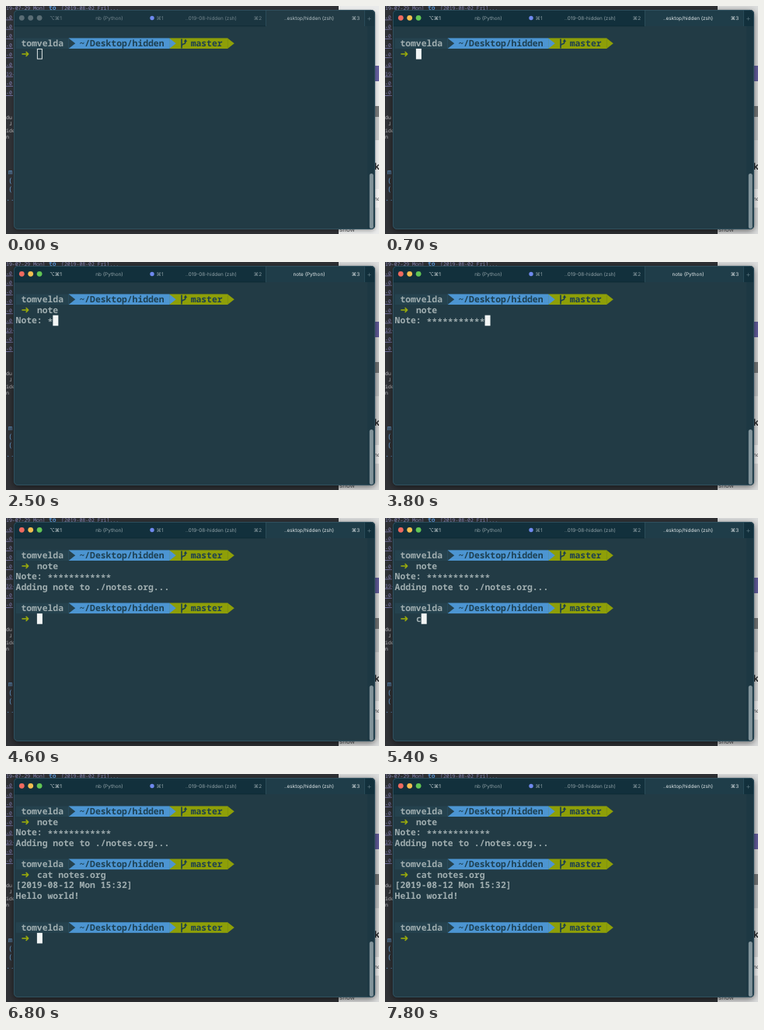
Write an HTML page with a canvas that moves like this. It is 480 px wide and 294 px high and loops after 7900 ms.

```html
<!DOCTYPE html>
<html lang="en">
<head>
<meta charset="utf-8">
<title>Terminal note</title>
<style>
html, body { margin: 0; width: 100%; height: 100%; overflow: hidden; background: #303236; }
canvas { display: block; }
</style>
</head>
<body>
<canvas id="stage" width="480" height="294"></canvas>
<script>
const ctx = document.getElementById('stage').getContext('2d');
const LOOP = 7900, LEFT = 12.6, TOP = 41.4, COL = 6.82, ROW = 13.62;
const MONO = '600 11.37px "Noto Sans Mono", "DejaVu Sans Mono", monospace';
const LABEL = '6.4px Inter, "DejaVu Sans", sans-serif';
const BG = '#223b45', BAR = '#12303c', TEXT = '#a0aeb0', INK = '#1d3f50';
const BLUE = '#4c95d2', GREEN = '#8e9f08';
const USER = 'tomvelda';

ctx.textBaseline = 'alphabetic';
ctx.textRendering = 'geometricPrecision';

const colX = col => LEFT + col * COL;
const rowY = row => TOP + row * ROW;

function rect(x, y, w, h, color) {
  ctx.fillStyle = color;
  ctx.fillRect(x, y, w, h);
}

function text(str, x, y, color, font, align = 'left') {
  ctx.font = font;
  ctx.fillStyle = color;
  ctx.textAlign = align;
  ctx.fillText(str, x, y);
}

function dot(x, y, r, color) {
  ctx.fillStyle = color;
  ctx.beginPath();
  ctx.arc(x, y, r, 0, 7);
  ctx.fill();
}

function write(str, col, row, color = TEXT) {
  text(str, colX(col), rowY(row) + 10.6, color, MONO);
}

function chevron(col, row, color) {
  const x = colX(col) - 0.2, y = rowY(row);
  ctx.fillStyle = color;
  ctx.beginPath();
  ctx.moveTo(x, y);
  ctx.lineTo(x + 8.6, y + ROW / 2);
  ctx.lineTo(x, y + ROW);
  ctx.fill();
}

function branchIcon(col, row) {
  ctx.save();
  ctx.translate(colX(col), rowY(row));
  ctx.strokeStyle = ctx.fillStyle = INK;
  ctx.lineWidth = 1.6;
  ctx.beginPath();
  ctx.moveTo(2, 1);
  ctx.lineTo(2, 13);
  ctx.moveTo(2, 10.5);
  ctx.quadraticCurveTo(2, 8.2, 4.5, 7.6);
  ctx.quadraticCurveTo(7, 7, 7, 4);
  ctx.stroke();
  ctx.beginPath();
  ctx.moveTo(4.8, 4.6);
  ctx.lineTo(7, 1);
  ctx.lineTo(9.2, 4.6);
  ctx.fill();
  ctx.restore();
}

function prompt(row, command) {
  const y = rowY(row);
  rect(LEFT, y, 10 * COL, ROW, '#25424e');
  rect(colX(10), y, 19 * COL, ROW, BLUE);
  rect(colX(29), y, 11 * COL, ROW, GREEN);
  chevron(10, row, '#25424e');
  chevron(29, row, BLUE);
  chevron(40, row, GREEN);
  write(USER, 1, row);
  write('~/Desktop/hidden', 12, row, INK);
  branchIcon(31, row);
  write('master', 33, row, INK);
  text('➜', colX(1), rowY(row + 1) + 11.2, '#9aab0c', 'bold 13px "DejaVu Sans", sans-serif');
  write(command, 4, row + 1);
}

function cursor(col, row, focused) {
  const x = colX(col), y = rowY(row);
  if (focused) return rect(x, y, 7, ROW, '#f2f5f5');
  ctx.strokeStyle = '#dfe6e6';
  ctx.lineWidth = 1;
  ctx.strokeRect(x + 0.5, y + 0.5, 6, ROW - 1);
}

function desktop(focused) {
  rect(0, 0, 480, 294, '#303236');
  rect(428, 0, 52, 294, focused ? '#dcdddd' : '#e9eaea');
  const small = '6.5px "Noto Sans Mono", monospace';
  text('19-07-29 Mon]', 0, 5, '#9291c4', small);
  text('to', 55, 5, '#5b9bdc', 'bold 8px "Noto Sans Mono", monospace');
  text('[2019-08-02 Fri]...', 71, 5, '#9291c4', small);

  for (let i = 0; i < 9; i++) {
    const y = 16.5 + i * 12.2;
    text(i === 6 ? '19-' : '-0', 0, y, '#8584bb', small);
    rect(0, y + 1, 9, 0.8, '#8584bb');
  }
  ['du', ' J', 'ide', 'n'].forEach((s, i) => text(s, 0, 146 + i * 8.3, '#b9babd', small));
  ['m', '(', '(', '..'].forEach((s, i) =>
    text(s, i < 3 ? 3 : 0, 217 + i * 11.2, '#65a0d6', '9px "Noto Sans Mono", monospace'));

  rect(473, 77, 7, 20, '#655f9f');
  rect(473, 129, 7, 14, '#77797a');
  rect(473, 143, 7, 30, '#c6c8c9');
  text('k', 474, 211, '#202124', '600 12px Inter, sans-serif');
  rect(473, 236, 7, 24, '#f4f4f4');
  text('nd', 474, 251, '#303236', '6.5px Inter, sans-serif');
  text('show', 429, 291, '#55585a', '8px Inter, sans-serif');
}

function windowFrame(focused, title) {
  ctx.save();
  ctx.shadowColor = focused ? 'rgba(0,0,0,.55)' : 'rgba(0,0,0,.3)';
  ctx.shadowBlur = focused ? 9 : 5;
  ctx.shadowOffsetY = 2;
  ctx.fillStyle = BG;
  ctx.beginPath();
  ctx.roundRect(10, 5, 465, 283, 5);
  ctx.fill();
  ctx.shadowColor = 'transparent';
  ctx.clip();
  rect(10, 5, 465, 21, focused ? BAR : '#1a3540');
  rect(334, 5, 127, 21, focused ? '#1f3d49' : BG);
  for (const x of [334, 461]) rect(x, 5, 0.8, 21, '#2d505d');
  rect(10, 25.5, 324, 0.8, '#0d2833');
  rect(465, 26, 10, 262, '#1d3843');
  ctx.fillStyle = '#82949b';
  ctx.beginPath();
  ctx.roundRect(467.8, 216, 5, 71, 2.5);
  ctx.fill();
  ctx.restore();
  ctx.strokeStyle = '#365967';
  ctx.lineWidth = 0.8;
  ctx.beginPath();
  ctx.roundRect(10.4, 5.4, 464.2, 282.2, 5);
  ctx.stroke();

  const lights = focused ? ['#ee6a5f', '#f3be50', '#62c655'] : Array(3).fill('#5a6d75');
  lights.forEach((color, i) => dot(20.3 + i * 11.4, 15.3, 3.4, color));
  const idle = focused ? '#8fa0a6' : '#72858c';
  const active = focused ? '#e0e7e8' : '#b4c0c4';
  const label = (str, x, color = idle) => text(str, x, 18, color, LABEL, 'center');
  label('⌥⌘1', 64, focused ? '#c9d2d4' : idle);
  label('nb (Python)', 133);
  dot(188, 15.5, 2.7, '#6f89ee');
  label('⌘1', 198);
  label('..019-08-hidden (zsh)', 264);
  label('⌘2', 324);
  label(title, 390, active);
  label('⌘3', 450, active);
  text('+', 467.5, 19, '#56707b', '9px Inter, sans-serif', 'center');
}

// Characters visible when one is typed every `step` ms from `start`.
const typed = (str, t, start, step) =>
  str.slice(0, Math.max(0, Math.floor((t - start) / step) + 1));

function session(t, focused) {
  const note = typed('note', t, 1100, 100);
  prompt(0, note);
  let at = [4 + note.length, 1];

  if (t >= 1700) at = [0, 2];
  if (t >= 2200) {
    const stars = typed('*'.repeat(12), t, 2400, 135);
    write('Note:', 0, 2);
    write(stars, 6, 2.1); // terminal asterisks sit slightly low
    at = [6 + stars.length, 2];
  }
  if (t >= 4300) {
    write('Adding note to ./notes.org...', 0, 3);
    at = [0, 4];
  }
  if (t >= 4500) {
    const command = t >= 6000 ? 'cat notes.org ' : typed('cat no', t, 5400, 100);
    prompt(5, command);
    at = [4 + command.length, 6];
  }
  if (t >= 6400) {
    write('[2019-08-12 Mon 15:32]', 0, 7);
    write('Hello world!', 0, 8);
    at = [0, 10];
  }
  if (t >= 6500) {
    prompt(11, '');
    at = [4, 12];
  }
  if (t < 7550) cursor(...at, focused);
}

function draw() {
  const t = performance.now() % LOOP;
  const focused = t >= 100;
  const running = t >= 1700 && t < 4500;
  desktop(focused);
  windowFrame(focused, running ? 'note (Python)' : '..esktop/hidden (zsh)');
  session(t, focused);
  requestAnimationFrame(draw);
}
draw();
</script>
</body>
</html>
```
